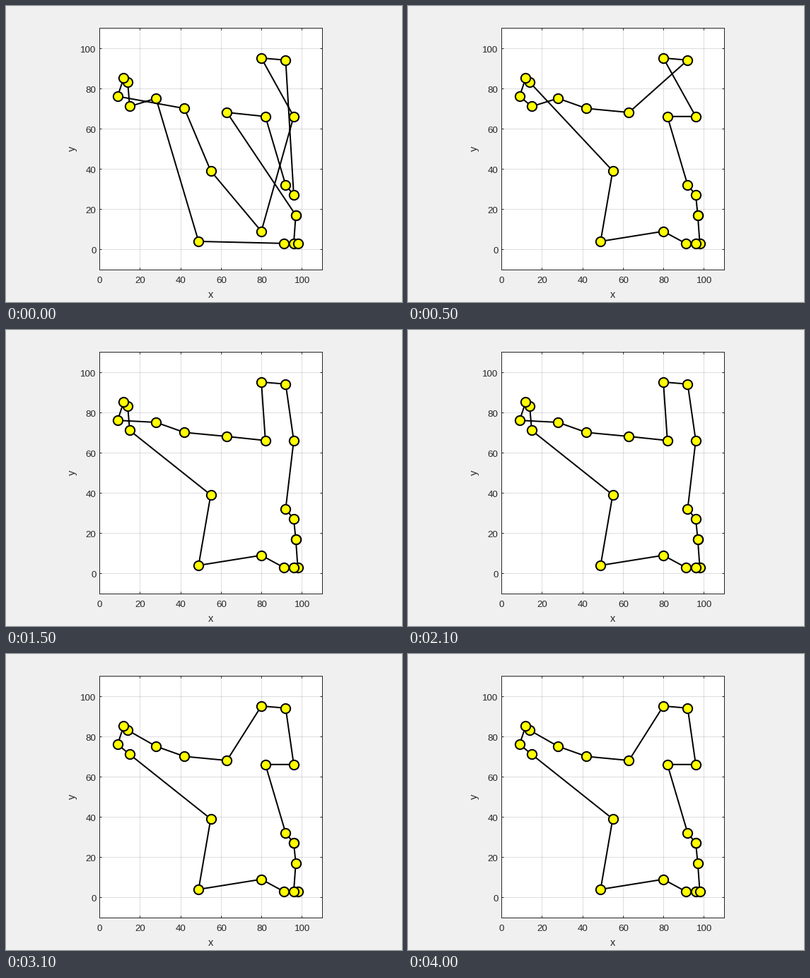
Write a matplotlib script that moves like this. It is 560 by 420 pixels and loops after 4.5 s.

```python
import matplotlib.pyplot as plt
from matplotlib.animation import FuncAnimation

W, H, DPI = 560, 420, 100
PX = 72 / DPI  # points per pixel
INK = "#262626"
LEFT, RIGHT, TOP, BOTTOM = 132, 447, 31, 374

plt.rcParams["font.family"] = "Liberation Sans"

CITIES = {
    "A": (15, 71), "B": (9, 76), "C": (12, 85), "D": (14, 83), "E": (28, 75),
    "F": (42, 70), "G": (55, 39), "H": (49, 4), "I": (80, 9), "J": (91, 3),
    "K": (96, 3), "L": (98, 3), "M": (97, 17), "N": (96, 27), "O": (92, 32),
    "P": (82, 66), "Q": (63, 68), "R": (96, 66), "S": (92, 94), "T": (80, 95),
}

# Visiting order also sets which marker lies on top; each tour with its beats.
TOURS = [
    ("MKLJHEADCBFGIRTSNOPQ", 1),
    ("MLKJIHGDCBAEFQSTRPON", 1),
    ("MLKJIHGABCDEFQPRSTON", 1),
    ("MLKJIHGADCBEFQPTSRON", 2),
    ("NOPRSTQFEDCBAGHIJLKM", 2),
    ("NOPRSTQFECDBAGHIJKLM", 1),
    ("NOPRSTQFEDCBAGHIJKLM", 1),
]
BEATS = [tour for tour, count in TOURS for _ in range(count)]

fig = plt.figure(figsize=(W / DPI, H / DPI), dpi=DPI, facecolor="#f0f0f0")
ax = fig.add_axes([LEFT / W, 1 - BOTTOM / H,
                   (RIGHT - LEFT) / W, (BOTTOM - TOP) / H])
ax.set(xlim=(0, 110), ylim=(-10, 110),
       xticks=range(0, 101, 20), yticks=range(0, 101, 20))
ax.set_axisbelow(True)
ax.grid(color=INK, alpha=0.15, lw=PX)
ax.tick_params(direction="in", length=3.4 * PX, width=PX, color=INK,
               top=True, right=True, labelleft=False, labelbottom=False)
for spine in ax.spines.values():
    spine.set(color=INK, linewidth=PX)


def label(x, y, text, size=13.33, **kw):
    """Text at stage pixels, measured from the top left."""
    fig.text(x / W, 1 - y / H, text, fontsize=size * PX, color=INK,
             **{"ha": "center", "va": "baseline", **kw})


for v in range(0, 101, 20):
    label(LEFT + v * (RIGHT - LEFT) / 110 + 0.5, 393, str(v))
    label(127.6, BOTTOM - (v + 10) * (BOTTOM - TOP) / 120 + 6, str(v),
          ha="right")
label(290, 413.5, "x", 14.67)
label(100.5, 202, "y", 14.67, rotation=90, ha="right", va="center")

route, = ax.plot([], [], "o-", color="black", lw=2 * PX, ms=13.33 * PX,
                 mfc="yellow", mec="black", mew=2 * PX, clip_on=False, zorder=5)


def draw(i):
    tour = BEATS[i % len(BEATS)]
    route.set_data(*zip(*(CITIES[c] for c in tour + tour[0])))
    return route,


anim = FuncAnimation(fig, draw, frames=len(BEATS), interval=500,
                     repeat=True, repeat_delay=0, blit=False)
plt.show()
```
